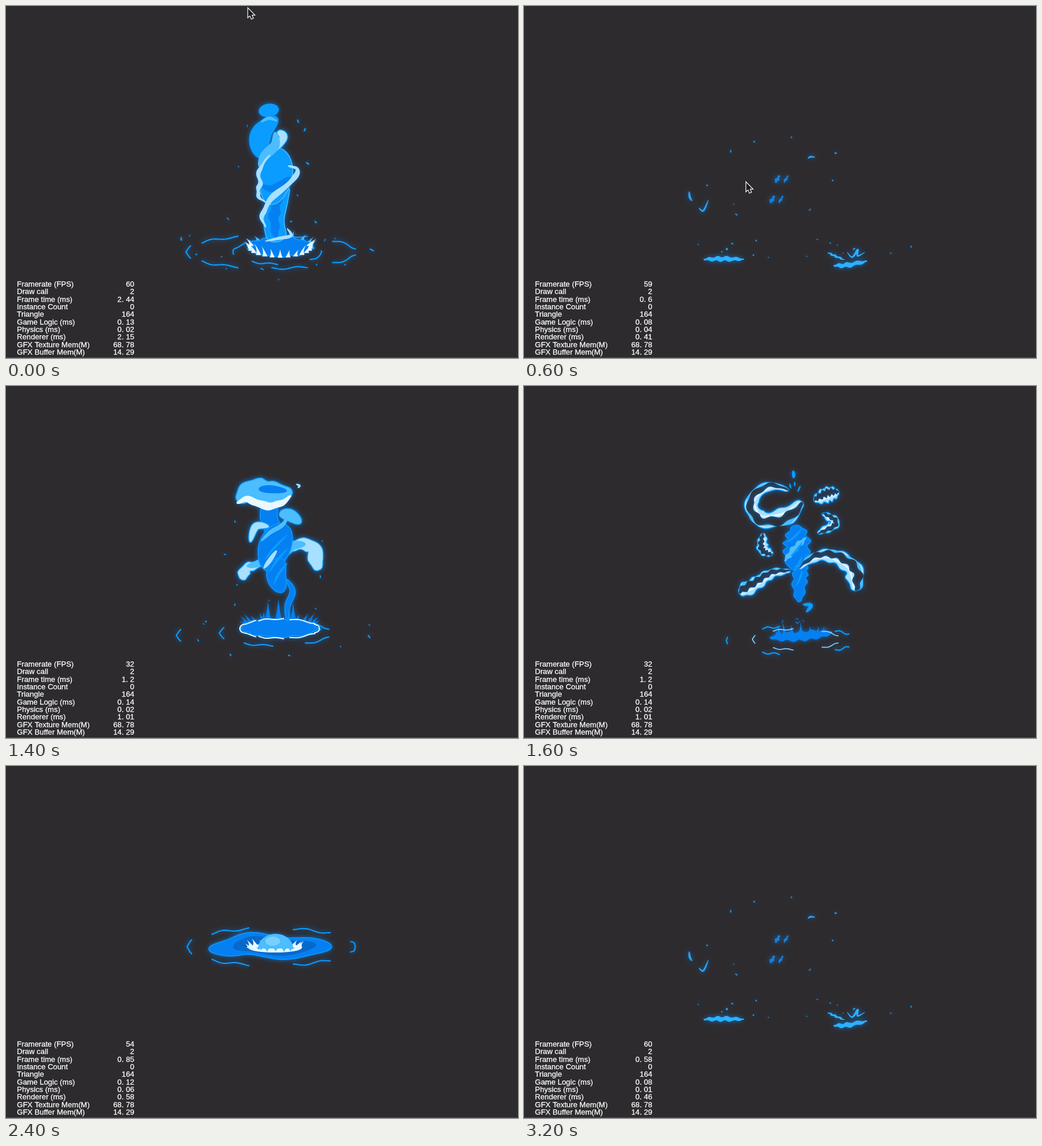
Write an HTML page with a canvas that moves like this. It is 902 by 621 pixels and loops after 3400 ms.

```html
<!DOCTYPE html>
<html lang="en">
<head>
<meta charset="utf-8">
<title>Water burst</title>
<style>
html, body { margin: 0; width: 100%; height: 100%; overflow: hidden; background: #2d2b2e; }
canvas { display: block; }
</style>
</head>
<body>
<canvas id="stage" width="902" height="621"></canvas>
<script>
const W = 902, H = 621, STEP = 200, LOOP = 3400, TAU = Math.PI * 2;
const DARK = '#0769ca', DEEP = '#0580f2', MID = '#0a9cff', LIGHT = '#4cbdff', PALE = '#a8e0ff', WHITE = '#e9f8ff';
const { sin, cos, min, max, sqrt, abs, PI } = Math;
const stage = document.getElementById('stage').getContext('2d');
let g;

function seeded(s) {
  return () => (s = (s * 16807) % 2147483647) / 2147483647;
}

// Width profiles along a ribbon, t from 0 to 1.
const leaf = t => max(0, sin(PI * t)) ** .6;
const flare = t => sqrt(t) * sqrt(min(1, (1 - t) * 6));
const band = t => sqrt(min(1, 8 * t, 8 * (1 - t)));

// Point at t on a smooth curve through the keys.
function along(keys, t) {
  const last = keys.length - 1, i = min(last - 1, Math.floor(t * last)), u = t * last - i;
  const [a, b, c, d] = [i - 1, i, i + 1, i + 2].map(k => keys[max(0, min(last, k))]);
  return [0, 1].map(k => b[k] + u / 2 * (c[k] - a[k]
    + u * (2 * a[k] - 5 * b[k] + 4 * c[k] - d[k] + u * (3 * (b[k] - c[k]) + d[k] - a[k]))));
}

// Filled band of half width w around a curve, with optional bumps and sideways shift.
function ribbon(color, keys, w, { shape = leaf, bump = 0, waves = 4, shift = 0, edge } = {}) {
  const n = 60, sides = [[], []];
  for (let i = 0; i <= n; i++) {
    const t = i / n, [x, y] = along(keys, t);
    const [x0, y0] = along(keys, max(0, t - .02)), [x1, y1] = along(keys, min(1, t + .02));
    const len = Math.hypot(x1 - x0, y1 - y0) || 1, nx = (y0 - y1) / len, ny = (x1 - x0) / len;
    [1, -1].forEach((s, k) => {
      const off = shape(t) * (shift + s * w * (1 + bump * sin(TAU * waves * t + k * 2)));
      sides[k].push([x + nx * off, y + ny * off]);
    });
  }
  g.beginPath();
  for (const p of [...sides[0], ...sides[1].reverse()]) g.lineTo(...p);
  g.closePath();
  g.fillStyle = color;
  g.fill();
  if (edge) { g.strokeStyle = edge; g.lineWidth = 1.5; g.stroke(); }
}
const lens = (color, keys, w, opt) => ribbon(color, keys, w, { edge: MID, ...opt });

function disc(color, x, y, rx, ry, from = 0, to = TAU) {
  g.beginPath();
  g.ellipse(x, y, rx, ry, 0, from, to);
  g.fillStyle = color;
  g.fill();
}

// Ellipse with a wavy rim.
function pool(color, cx, cy, rx, ry, rim) {
  g.beginPath();
  for (let a = 0; a < TAU; a += .08) {
    const r = 1 + .05 * sin(9 * a) + .04 * sin(14 * a);
    g.lineTo(cx + rx * r * cos(a), cy + ry * r * sin(a));
  }
  g.closePath();
  g.fillStyle = color;
  g.fill();
  if (rim) { g.strokeStyle = rim; g.lineWidth = 1.8; g.stroke(); }
}

// Pointed teeth standing on an elliptic arc, leaning outwards.
function teeth(color, n, cx, cy, rx, ry, tall, { from = -.3, to = PI + .3, half = 5, lean = .2, seed = 5 } = {}) {
  const rnd = seeded(seed);
  g.fillStyle = color;
  for (let i = 0; i < n; i++) {
    const a = from + (to - from) * i / (n - 1), c = cos(a);
    const x = cx + rx * c, y = cy + ry * sin(a), h = tall * (.65 + .6 * rnd()), tip = x + lean * rx * c;
    g.beginPath();
    g.moveTo(x - half, y);
    g.quadraticCurveTo(x - half * .3, y - h * .4, tip, y - h);
    g.quadraticCurveTo(x + half * .3, y - h * .4, x + half, y);
    g.fill();
  }
}

// Broken ripples spread evenly round an ellipse, thinnest in length at front and back.
function ripples(color, n, cx, cy, rx, ry, { start = PI, size = .33, width = 2.2 } = {}) {
  g.strokeStyle = color;
  g.lineWidth = width;
  for (let i = 0; i < n; i++) {
    const mid = start + TAU * i / n;
    g.beginPath();
    for (let u = -1; u <= 1; u += .1) {
      const a = mid + u * size * (.55 + .45 * abs(cos(mid)));
      g.lineTo(cx + rx * cos(a), cy + ry * sin(a) + ry * .06 * sin(u * 4));
    }
    g.stroke();
  }
}

// Droplets scattered in an elliptic ring.
function spray(seed, n, cx, cy, rx, ry, { inner = .7, size = 4, color = MID } = {}) {
  const rnd = seeded(seed * 7919);
  g.strokeStyle = color;
  for (let i = 0; i < n; i++) {
    const a = TAU * (i + rnd()) / n, r = inner + (1 - inner) * rnd();
    const x = cx + rx * r * cos(a), y = cy + ry * r * sin(a), len = size * rnd(), dir = rnd() * PI;
    g.globalAlpha = .5 + .5 * rnd();
    g.lineWidth = 1.6 + 1.4 * rnd();
    g.beginPath();
    g.moveTo(x, y);
    g.lineTo(x + len * cos(dir), y + len * sin(dir));
    g.stroke();
  }
  g.globalAlpha = 1;
}

function scaled(cx, cy, sx, sy, draw) {
  g.save();
  g.translate(cx, cy);
  g.scale(sx, sy);
  g.translate(-cx, -cy);
  draw();
  g.restore();
}

function crown(x, y) {
  teeth(LIGHT, 9, x, y, 54, 14, 14, { from: PI, to: TAU, seed: 8 });
  pool(DEEP, x, y, 56, 17, MID);
  teeth(WHITE, 15, x, y + 3, 53, 16, 17, { half: 4.5 });
}

function tower() {
  ripples(MID, 7, 467, 434, 150, 29);
  ripples(MID, 4, 478, 434, 78, 21, { start: .3, size: .45 });
  spray(3, 16, 467, 425, 180, 58, { inner: .55, size: 6 });
  spray(4, 9, 472, 260, 64, 105, { inner: .8, size: 7 });
  crown(483, 425);
  ribbon(MID, [[484, 312], [478, 345], [472, 380], [479, 416]], 18, { shape: band, edge: LIGHT });
  ribbon(DEEP, [[486, 322], [473, 365], [476, 412]], 9, { bump: .2 });
  lens(MID, [[477, 250], [476, 295], [465, 350]], 29, { edge: LIGHT });
  ribbon(DEEP, [[449, 316], [470, 322], [500, 308], [475, 338]], 7);
  lens(MID, [[446, 187], [463, 184], [480, 182]], 11);
  lens(MID, [[478, 197], [453, 220], [446, 243], [450, 268]], 18);
  lens(PALE, [[478, 221], [488, 232], [468, 260]], 8);
  ribbon(LIGHT, [[474, 222], [474, 245], [456, 264], [446, 284]], 9);
  ribbon(LIGHT, [[449, 205], [463, 198], [478, 203]], 3);
  ribbon(PALE, [[466, 262], [447, 288], [447, 315], [444, 333], [457, 347]], 4, { bump: .4 });
  ribbon(PALE, [[496, 282], [512, 287], [507, 306], [478, 329], [457, 356], [451, 374], [458, 391]], 5, { bump: .3 });
  ribbon(PALE, [[456, 415], [480, 410], [502, 405], [495, 392]], 3);
}

function twist() {
  ripples(MID, 5, 474, 436, 98, 22, { size: .4 });
  ripples(MID, 1, 470, 440, 170, 30, { size: .3 });
  spray(6, 11, 475, 430, 172, 50, { inner: .75, size: 5 });
  spray(9, 7, 476, 290, 90, 95, { inner: .9 });
  pool(DEEP, 482, 427, 68, 16, MID);
  teeth(DEEP, 5, 480, 426, 26, 4, 42, { from: PI, to: TAU, half: 8, lean: 0 });
  teeth(DEEP, 13, 482, 424, 60, 8, 16, { from: PI, to: TAU, half: 5 });
  ripples(WHITE, 7, 482, 428, 70, 17, { start: 0, size: .5, width: 2 });
  ribbon(DEEP, [[494, 341], [505, 362], [496, 388], [495, 414]], 5, { edge: MID });
  lens(DEEP, [[465, 210], [463, 232], [472, 256]], 15, { shape: band });
  lens(PALE, [[464, 248], [440, 248], [430, 276]], 7);
  lens(LIGHT, [[481, 226], [500, 228], [520, 242]], 11);
  lens(PALE, [[484, 308], [507, 282], [540, 285], [549, 326]], 15, { shape: flare, bump: .12 });
  ribbon(LIGHT, [[486, 305], [503, 283], [528, 279]], 8);
  lens(PALE, [[476, 295], [445, 314], [424, 322], [415, 342]], 11, { shape: flare, bump: .12 });
  ribbon(LIGHT, [[470, 301], [445, 313], [424, 318]], 6);
  lens(DEEP, [[494, 245], [474, 282], [461, 327]], 28);
  lens(DEEP, [[486, 304], [476, 333], [487, 364]], 17);
  for (let i = 0; i < 3; i++) ribbon(MID, [[456 + i * 8, 306 + i * 22], [474 + i * 3, 284 + i * 24], [496, 262 + i * 25]], 2);
  ribbon(LIGHT, [[498, 227], [487, 245], [466, 258], [449, 274]], 4);
  ribbon(PALE, [[477, 290], [465, 307], [454, 322]], 4);
  lens(LIGHT, [[407, 203], [432, 186], [465, 188], [505, 188]], 22, { bump: .08 });
  ribbon(WHITE, [[406, 207], [426, 200], [455, 211], [482, 208], [503, 193]], 7, { bump: .15 });
  ribbon(DEEP, [[445, 182], [465, 182], [495, 185]], 7);
  ribbon(PALE, [[511, 173], [517, 176], [514, 180]], 2);
}

// A curling cloud; "hole" is the share eaten away from inside.
function cloud(keys, w, hole, shape = flare) {
  lens(PALE, keys, w, { shape, bump: .16, waves: 5 });
  ribbon(LIGHT, keys, w * .4, { shape, bump: .3, shift: w * .5 });
  ribbon(WHITE, keys, w * .1, { shape, bump: .5, shift: -w * .4 });
  if (!hole) return;
  g.globalCompositeOperation = 'destination-out';
  ribbon('#000', keys, w * hole, { shape, bump: .35, waves: 7, shift: w * .25 });
  g.globalCompositeOperation = 'source-over';
}

function plume(hole) {
  cloud([[467, 191], [435, 184], [407, 208], [420, 237], [458, 235], [490, 210]], 16, hole);
  cloud([[549, 194], [530, 198], [508, 208]], 12, hole, leaf);
  cloud([[514, 262], [542, 245], [522, 229]], 8, hole, leaf);
  cloud([[426, 262], [425, 287], [441, 297]], 9, hole, leaf);
  cloud([[470, 325], [440, 329], [413, 346], [386, 362]], 13, hole);
  cloud([[576, 358], [573, 324], [545, 302], [512, 301], [483, 321]], 16, hole, t => flare(1 - t));
}

function shards() {
  lens(DEEP, [[480, 240], [481, 280], [473, 326]], 25, { bump: .18, waves: 5 });
  lens(DEEP, [[496, 309], [487, 340], [485, 387]], 14, { bump: .2, waves: 5 });
  ribbon(LIGHT, [[500, 264], [476, 285], [455, 309]], 6, { bump: .3 });
  for (let i = 0; i < 4; i++) ribbon(MID, [[462 + i * 6, 272 + i * 28], [476 + i * 4, 262 + i * 26], [492, 246 + i * 27]], 2);
  ribbon(MID, [[493, 392], [510, 394], [500, 407]], 4);
}

function wake() {
  ribbon(DEEP, [[432, 444], [490, 441], [545, 435]], 8, { bump: .25, waves: 6 });
  teeth(DEEP, 9, 488, 442, 42, 5, 19, { from: PI, to: TAU, half: 4, lean: .1 });
  spray(11, 5, 475, 414, 22, 4, { color: DEEP });
  ripples(PALE, 5, 480, 447, 79, 18, { size: .35, width: 1.5 });
  ripples(MID, 5, 470, 449, 116, 24, { size: .2 });
}

function crest(y) {
  ribbon(MID, [[474, y], [475, y + 7], [475, y + 14]], 3);
  ribbon(MID, [[468, y + 23], [470, y + 32]], 1.4);
  ribbon(MID, [[477, y + 20], [477, y + 28]], 1.4);
  ribbon(MID, [[487, y + 27], [482, y + 38]], 1.4);
}

function burst() {
  wake();
  spray(13, 7, 470, 450, 182, 38, { inner: .85 });
  shards();
  plume(0);
  crest(151);
}

function burstLate() {
  scaled(470, 320, .98, 1, wake);
  scaled(480, 310, .85, .92, shards);
  scaled(475, 300, 1.08, 1.06, () => plume(.5));
  crest(149);
}

function scatter() {
  const sky = '#28a4f4';
  ribbon('#2bb1ff', [[316, 447], [350, 446], [388, 447]], 4, { bump: .35, waves: 5 });
  ribbon('#2bb1ff', [[545, 458], [570, 457], [605, 450]], 4, { bump: .35 });
  ribbon('#2bb1ff', [[535, 435], [548, 441], [565, 448]], 2, { bump: .4 });
  ribbon('#2bb1ff', [[569, 434], [577, 443], [583, 438], [588, 430], [588, 441], [601, 434]], 1.8);
  ribbon(sky, [[291, 327], [292, 337], [296, 344]], 2);
  ribbon(sky, [[308, 356], [316, 361], [325, 342]], 1.6);
  ribbon(sky, [[500, 269], [505, 266], [513, 267]], 1.6);
  for (let i = 0; i < 4; i++) {
    const x = 437 + i % 2 * 15 + (i > 1 ? 9 : 0), y = 342 - (i > 1 ? 36 : 0);
    ribbon('#1680dc', [[x + 5, y - 7], [x, y], [x - 3, y + 6]], i % 2 ? 2 : 3, { bump: .4, waves: 2 });
  }
  spray(17, 16, 470, 428, 222, 18, { inner: .5, size: 2, color: sky });
  spray(19, 9, 430, 300, 145, 80, { inner: .7, size: 3, color: sky });
}

function fade() {
  scaled(468, 320, .93, .95, scatter);
  scaled(475, 300, 1.18, 1.12, () => plume(.78));
  scaled(480, 300, .6, .75, shards);
}

function scatterEarly() {
  scaled(467, 320, .99, 1, scatter);
  scaled(475, 300, 1.22, 1.12, () => plume(.88));
}

function rings() {
  g.strokeStyle = '#199cf7';
  for (const [cx, cy, ry] of [[362, 382, 10], [579, 389, 8]]) {
    for (const back of [0, 1]) {
      g.setLineDash(back ? [24, 13] : []);
      g.lineWidth = back ? 2.6 : 3.4;
      g.beginPath();
      for (let a = -.15; a <= PI + .15; a += .05) {
        const s = back ? -1 : 1;
        g.lineTo(cx + 55 * cos(a), cy + s * ry * sin(a) ** (a > 0 && a < PI ? .7 : 1) - 2.5 * sin(2 * a + back));
      }
      g.stroke();
    }
  }
  g.setLineDash([]);
  for (let i = 0; i < 4; i++) {
    const x = i < 2 ? 465 + i * 7 : 442 + (i - 2) * 16, y = i < 2 ? 230 + i * 10 : 280;
    ribbon('#199cf7', [[x + 3, y - 3], [x - 2, y + 3]], 1.6);
  }
}

function puddle() {
  ripples(MID, 6, 467, 319, 148, 33);
  lens(DEEP, [[357, 323], [392, 321], [432, 313], [488, 322], [540, 318], [574, 319]], 20);
  ribbon(DARK, [[400, 320], [435, 314], [490, 321], [547, 315]], 15);
  teeth(WHITE, 10, 473, 321, 44, 5, 12, { from: PI, to: TAU, lean: .18 });
  disc(WHITE, 474, 321, 47, 8);
  disc(LIGHT, 475, 322, 31, 26, PI, TAU);
  teeth(LIGHT, 7, 475, 320, 30, 2, -6, { from: 0, to: PI, half: 4, lean: 0 });
  disc('#79d0ff', 470, 309, 13, 8);
}

function ripple() {
  ripples(MID, 6, 467, 318, 182, 23);
  lens(DEEP, [[395, 319], [435, 316], [490, 320], [543, 318]], 13);
  disc(LIGHT, 468, 318, 21, 5);
}

function rise() {
  ripples(MID, 6, 468, 348, 165, 30);
  spray(23, 8, 470, 325, 130, 55, { inner: .7 });
  crown(471, 340);
  lens(MID, [[469, 256], [470, 295], [468, 338]], 24, { shape: band, bump: .12, waves: 2 });
  ribbon(DEEP, [[484, 280], [466, 305], [468, 335]], 10);
  ribbon(PALE, [[492, 279], [469, 297], [449, 328]], 4);
  ribbon(LIGHT, [[449, 281], [463, 276], [475, 262]], 3);
}

function rippleWide() {
  scaled(467.5, 318, 1.03, 1, ripple);
}

function bake(draw) {
  const c = document.createElement('canvas');
  c.width = W;
  c.height = H;
  g = c.getContext('2d');
  g.lineCap = g.lineJoin = 'round';
  draw();
  return c;
}
const timeline = [tower, burst, burst, scatter, null, ripple, rise, twist, burstLate, scatterEarly,
  rings, rippleWide, puddle, tower, burst, fade, scatter];
const art = new Map([...new Set(timeline)].filter(Boolean).map(f => [f, bake(f)]));

const labels = ['Framerate (FPS)', 'Draw call', 'Frame time (ms)', 'Instance Count', 'Triangle', 'Game Logic (ms)',
  'Physics (ms)', 'Renderer (ms)', 'GFX Texture Mem(M)', 'GFX Buffer Mem(M)'];
// First step, then rate, frame time, logic, physics, renderer.
const stats = [
  [0, '60', '2. 44', '0. 13', '0. 02', '2. 15'],
  [1, '59', '0. 6', '0. 08', '0. 04', '0. 41'],
  [4, '60', '0. 72', '0. 09', '0. 03', '0. 55'],
  [6, '32', '1. 2', '0. 14', '0. 02', '1. 01'],
  [9, '57', '4. 13', '0. 09', '0. 02', '3. 97'],
  [11, '54', '0. 85', '0. 12', '0. 06', '0. 58'],
  [14, '60', '0. 58', '0. 08', '0. 01', '0. 46']
];
const pointer = [[426, 4], [533, 181], [391, 440], [391, 311]];
const arrowShape = new Path2D('M0 0V15L3.4 11.9L6 18L8.6 16.9L6.1 11H10.7Z');

function panel(step) {
  const [, fps, time, logic, physics, render] = stats.filter(s => s[0] <= step).pop();
  const values = [fps, '2', time, '0', '164', logic, physics, render, '68. 78', '14. 29'];
  stage.font = '13.33px "Liberation Sans", Arial, sans-serif';
  stage.fillStyle = stage.strokeStyle = '#fff';
  stage.lineWidth = .3;
  const put = (text, align, x, y) => {
    stage.textAlign = align;
    stage.fillText(text, x, y);
    stage.strokeText(text, x, y);
  };
  labels.forEach((label, i) => {
    const y = 495 + i * 13.33;
    put(label, 'left', 19.3, y);
    put(values[i], 'right', 226, y);
  });
}
function arrow([x, y]) {
  stage.save();
  stage.translate(x + .5, y + .5);
  stage.fillStyle = '#1c1b1d';
  stage.strokeStyle = '#fff';
  stage.lineWidth = 2.4;
  stage.stroke(arrowShape);
  stage.fill(arrowShape);
  stage.restore();
}
function draw(step) {
  stage.fillStyle = '#2d2b2e';
  stage.fillRect(0, 0, W, H);
  stage.fillStyle = '#565356';
  stage.fillRect(0, H - 1, W, 1);
  const pose = art.get(timeline[step]);
  if (pose) {
    stage.save();
    stage.filter = 'blur(0.5px)';
    stage.shadowColor = 'rgba(7, 130, 245, .8)';
    stage.shadowBlur = 8;
    stage.drawImage(pose, 0, 0);
    stage.restore();
  }
  panel(step);
  if (pointer[step]) arrow(pointer[step]);
}

const start = performance.now();
let shown = -1;
function tick() {
  const step = Math.floor((performance.now() - start) % LOOP / STEP);
  if (step !== shown) draw(shown = step);
  requestAnimationFrame(tick);
}
tick();
</script>
</body>
</html>
```
